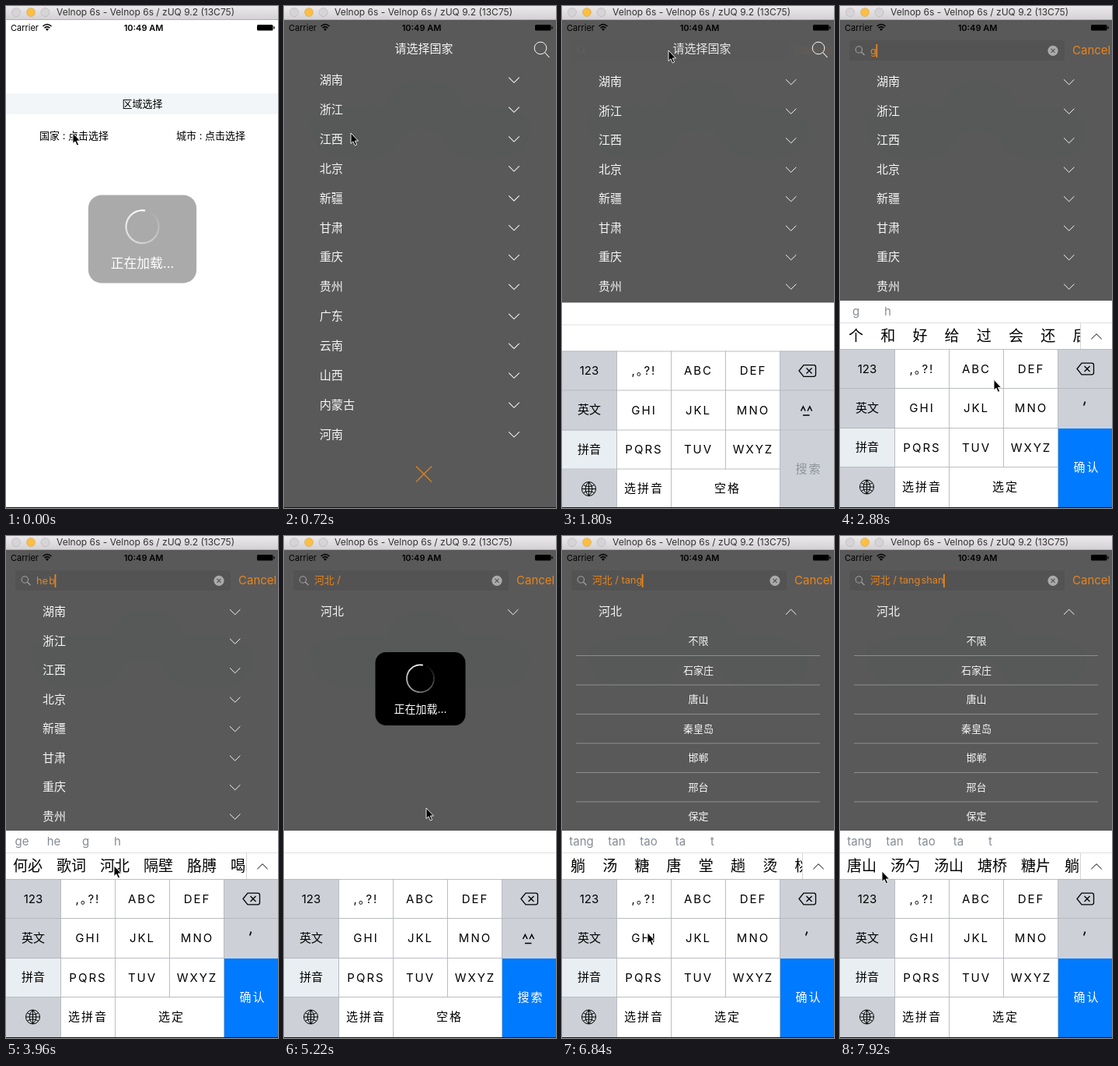
Recreate the animation shown at these times as an HTML page. Size 350x644 px, loop 8 s.

```html
<!DOCTYPE html>
<html lang="zh-CN">
<head>
<meta charset="utf-8">
<style>
html, body { margin: 0; width: 100%; height: 100%; overflow: hidden; background: #fff; }
svg { display: block; width: 100vw; height: 100vh; font-family: Inter, "Noto Sans CJK SC", "Noto Sans CJK", sans-serif; }
</style>
</head>
<body>
<svg id="stage" viewBox="0 0 350 644"></svg>
<script>
const stage = document.getElementById('stage');
const STEP = 180, LOOP = 8000, ORANGE = '#e8841c', BLUE = '#007aff', WHITE = '#f6f6f6';

const provinces = '湖南 浙江 江西 北京 新疆 甘肃 重庆 贵州 广东 云南 山西 内蒙古 河南'.split(' ');
const cities = '不限 石家庄 唐山 秦皇岛 邯郸 邢台 保定'.split(' ');

// step, field text, pinyin choices, candidates
const typing = [
  [0, '', '', ''],
  [14, 'g', 'g h', '个 和 好 给 过 会 还 后'],
  [17, 'he', 'ge he g h', '和 个 合 喝 给 何 河 歌'],
  [20, 'he\u200ab', 'ge he g h', '何必 歌词 河北 隔壁 胳膊 喝'],
  [24, '河北', '', ''],
  [27, '河北 /', '', ''],
  [33, '河北 / t', 't', '他 天 它 她 听 通 同 头'],
  [35, '河北 / ta', 'ta t', '他 它 她 踏 塔 台 太 才'],
  [36, '河北 / tan', 'tan tao ta t', '谈 叹 弹 探 摊 套 逃 桃'],
  [38, '河北 / tang', 'tang tan tao ta t', '躺 汤 糖 唐 堂 趟 烫 桃'],
  [40, '河北 / tang\u200as', 'tang tan tao ta t', '堂上 躺上 汤山 唐山 糖水 躺'],
  [41, '河北 / tang\u200ash', 'tang tan tao ta t', '堂上 躺上 汤山 唐山 糖水 躺'],
  [42, '河北 / tang\u200asha', 'tang tan tao ta t', '唐山 汤勺 汤山 塘桥 糖片 躺'],
  [43, '河北 / tang\u200ashan', 'tang tan tao ta t', '唐山 汤勺 汤山 塘桥 糖片 躺']
];

const pointer = [[4, 86, 163], [7, 329, 55], [8, 329, 55], [10, 137, 57], [12, 140, 300], [14, 108, 512],
  [17, 243, 463], [20, 176, 462], [22, 139, 423], [24, 138, 421], [26, 312, 582], [27, 310, 580],
  [29, 183, 349], [31, 165, 400], [33, 174, 560], [35, 175, 462], [36, 240, 512], [38, 110, 509],
  [40, 106, 562], [41, 108, 512], [42, 175, 462], [43, 238, 510], [44, 54, 430]];

// linear interpolation between [step, value, ...] points
function key(k, pts, col = 1) {
  if (k <= pts[0][0]) return pts[0][col];
  for (let i = 1; i < pts.length; i++) {
    const a = pts[i - 1], b = pts[i];
    if (k <= b[0]) return a[col] + (b[col] - a[col]) * (k - a[0]) / (b[0] - a[0]);
  }
  return pts[pts.length - 1][col];
}

// text centred vertically on y; Chinese glyphs sit lower than Latin capitals
const text = (x, y, s, size, fill = '#000', anchor = 'middle', more = '') =>
  `<text x="${x}" y="${y + size * (/[\u4e00-\u9fff]/.test(s) ? 0.33 : 0.36)}" font-size="${size}" fill="${fill}" text-anchor="${anchor}" ${more}>${s}</text>`;
const rect = (x, y, w, h, fill, r = 0) =>
  `<rect x="${x}" y="${y}" width="${w}" height="${h}" rx="${r}" fill="${fill}"/>`;
const line = (d, stroke, w = 1) =>
  `<path d="${d}" fill="none" stroke="${stroke}" stroke-width="${w}"/>`;
const dot = (x, y, r, fill, more = '') => `<circle cx="${x}" cy="${y}" r="${r}" fill="${fill}" ${more}/>`;
const group = (s, opacity, transform = '') => `<g opacity="${opacity}" transform="${transform}">${s}</g>`;
const zoom = (x, y, s) => `translate(${x} ${y}) scale(${s}) translate(${-x} ${-y})`;
const chevron = (x, y, up, color, w = 1) => {
  const d = up ? -3.3 : 3.3;
  return line(`M${x - 6.7} ${y - d}L${x} ${y + d}L${x + 6.7} ${y - d}`, color, w);
};

function windowBar() {
  return rect(0, 0, 350, 18, 'url(#bar)') + rect(0, 17, 350, 1, '#b0aeb0') +
    [['#d6d4d6', 13], ['#fdbe41', 32], ['#d6d4d6', 50.5]].map(([c, x]) =>
      dot(x, 8, 5.5, c, 'stroke="#0002" stroke-width=".8"')).join('') +
    text(65, 8, 'Velnop 6s - Velnop 6s / zUQ 9.2 (13C75)', 12, '#333', 'start');
}

function statusBar() {
  return text(6, 28, 'Carrier', 11, '#000', 'start') +
    text(177, 28, '10:49 AM', 11, '#000', 'middle', 'font-weight="600"') +
    line('M47.5 26Q53 21 58.5 26M49.5 28.3Q53 25 56.5 28.3', '#000', 1.5) +
    '<path d="M51 29.6Q53 28 55 29.6L53 32z"/>' +
    rect(323, 24, 20.5, 7.5, '#000', 1.5) + rect(344.3, 26.2, 1.4, 3.2, '#000', 0.6);
}

function home() {
  return rect(0, 112, 350, 27, '#f2f6f8') + text(175.5, 126, '区域选择', 13) +
    text(43, 167, '国家 : 点击选择', 13, '#000', 'start') +
    text(219, 167, '城市 : 点击选择', 13, '#000', 'start');
}

function backdrop() {
  return rect(0, 18, 350, 626, '#595959') +
    '<path fill="#525a57" opacity=".35" d="M35 140Q90 122 133 130Q140 96 180 95Q222 98 226 128Q320 125 317 160Q315 195 260 196Q215 195 208 175Q200 158 175 158Q150 158 142 182Q130 200 80 195Q30 190 35 140z"/>';
}

function list(k) {
  const rowY = i => 97.5 + 37.5 * i;
  const row = (s, i, up) => text(47, rowY(i), s, 15, WHITE, 'start') + chevron(294.7, rowY(i), up, WHITE);
  if (k < 27) return provinces.map((s, i) => row(s, i, false)).join('');
  const open = key(k, [[30, 0], [32, 1]]);
  const sub = cities.map((s, i) => text(175.5, 97.5 + 37.5 * (i + 1) * open, s, 13, WHITE) +
    line(`M18 ${97.5 + (37.5 * i + 56) * open}H332`, '#8e8e8e')).join('');
  return row('河北', 0, open > 0) + (open ? group(sub, open) : '');
}

function titleRow() {
  return text(180, 55.5, '请选择国家', 15, WHITE) +
    '<circle cx="330" cy="54" r="7.8" fill="none" stroke="#f6f6f6"/>' +
    line('M335.5 59.5L341.5 66', WHITE, 1.1);
}

function searchBar(s) {
  let out = rect(12, 44, 277, 26, '#535353', 4) +
    '<circle cx="24.3" cy="56" r="4.2" fill="none" stroke="#a2a2a2" stroke-width="1.1"/>' +
    line('M27.3 59L31.5 63', '#a2a2a2', 1.3) +
    text(39, 57, s, 12.8, ORANGE, 'start', 'id="field"') +
    '<rect id="caret" y="49" width="1.8" height="17" fill="' + ORANGE + '"/>' +
    text(299, 56.7, 'Cancel', 15, ORANGE, 'start');
  if (s) out += dot(274, 57.3, 6.6, '#aaa') + line('M271.5 54.8l5 5m0-5l-5 5', '#555', 1.2);
  return out;
}

function keyboard(s, pinyin, cands) {
  const busy = cands !== '', rows = [465.5, 516, 566.5, 617], rule = '#b3b6bc';
  const cap = (x, row, s) => text(x + 1, rows[row], s, 15, '#000', 'middle', 'letter-spacing="2"');
  let out = rect(0, 378, 350, 266, '#fff') + line('M0 406.5H350', '#dfe0e2');

  if (busy) {
    const py = pinyin.split(' '), words = cands.split(' ');
    const wide = py[0].length > 3 ? 9 : 0, pairs = words[0].length > 1;
    out += py.map((p, i) => text(20.5 + 41 * i + (i ? wide : wide / 2), 392, p, 15, '#868b95')).join('') +
      words.map((w, i) => text(pairs ? 9 + 56 * i : 11 + 41.2 * i, 424, w, 19, '#000', 'start')).join('') +
      rect(309, 408, 41, 32, '#fff') + line('M309.5 407V440', '#d4d6d9') + chevron(330, 424, true, '#000');
  }

  out += rect(0, 440, 70, 204, '#cdd1d7') + rect(0, 542, 70, 50, '#e9eef2') +
    rect(281, 440, 69, 102, '#cdd1d7') + rect(281, 542, 69, 102, s ? BLUE : '#cdd1d7') +
    line('M0 440.5H350M0 490.5H350M0 541.5H281M0 591.5H281M70.5 440V643M140.5 440V643M210.5 440V592M280.5 440V643', rule, 0.9);
  if (!s) out += line('M281 541.5H350', rule, 0.9);

  ['123', '英文', '拼音'].forEach((t, i) => out += text(35, rows[i], t, 15));
  [',｡?!', 'ABC', 'DEF', 'GHI', 'JKL', 'MNO', 'PQRS', 'TUV', 'WXYZ'].forEach((t, i) =>
    out += cap([104.5, 174.5, 245][i % 3], Math.floor(i / 3), t));
  out += cap(104.5, 3, '选拼音') + cap(212, 3, busy ? '选定' : '空格') +
    text(317.5, 591.7, busy ? '确认' : '搜索', 15, s ? '#fff' : '#8e939b', 'middle', 'letter-spacing="2"');

  // globe, backspace, face
  out += line('M25.5 617a9 9 0 1 0 18 0a9 9 0 1 0-18 0H43.5M34.5 608V626M34.5 608q-9 9 0 18q9-9 0-18M27.5 612q7 4 14 0M27.5 622q7-4 14 0', '#000', 1);
  out += line('M305 465.5l6-7.3H324q2.5 0 2.5 2.5v9.6q0 2.5-2.5 2.5H311zM314.5 462l7 7m0-7l-7 7', '#000', 1.3);
  out += busy ? line('M315.5 507.5l-1.8 5', '#000', 1.7)
    : line('M307.5 517l2.8-5.5 2.8 5.5M316 517l2.8-5.5 2.8 5.5M310 522.5h8.5', '#000', 1.5);
  return out;
}

function hud(y, scale, opacity, turn) {
  const n = 24, r = 17.5, at = a => `${r * Math.sin(a)} ${-r * Math.cos(a)}`;
  let ring = '';
  for (let i = 0; i < n; i++) {
    const a = -i * 0.25;
    ring += `<path d="M${at(a)}A${r} ${r} 0 0 0 ${at(a - 0.26)}" opacity="${1 - i / n}"/>`;
  }
  return group(rect(-58, -47, 116, 94, '#000', 14) +
    `<g transform="translate(0 -13.2) rotate(${turn})" fill="none" stroke="#fff" stroke-width="1.8">${ring}</g>` +
    text(0, 26.5, '正在加载...', 14, '#fff'), opacity, `translate(175.5 ${y}) scale(${scale})`);
}

function draw(k) {
  const [, s, pinyin, cands] = typing.filter(e => e[0] <= k).pop();
  const veil = key(k, [[2, 0], [4, 1]]);
  const grow = key(k, [[2, 1.1], [4, 1.0107], [5, 1]]);
  const drop = key(k, [[8, 266], [9, 50], [10, 2.5], [11, 0]]);
  const search = key(k, [[9, 0], [10, 0.08], [11, 0.6], [12, 1]]);
  const turn = 10 + 0.345 * k * STEP;

  let out = '<defs><linearGradient id="bar" x2="0" y2="1"><stop stop-color="#ebe9eb"/><stop offset="1" stop-color="#d2d0d2"/></linearGradient></defs>' +
    rect(0, 0, 350, 644, '#fff') + home();
  if (veil) {
    out += group(backdrop() + group(list(k), 1, zoom(175, 331, grow)) +
      line('M170 590.5l20 20m0-20l-20 20', ORANGE, 1.1) +
      group(titleRow(), k <= 10 ? 1 : 1 - search), veil);
  }
  if (search) out += group(searchBar(s), search);
  out += statusBar();
  if (drop < 266) out += group(keyboard(s, pinyin, cands), 1, `translate(0 ${drop})`);
  if (k < 4) {
    out += hud(299, key(k, [[0, 1.2], [1, 1], [2, 1], [3, 0.87]]), key(k, [[0, 0.33], [1, 1], [2, 1], [3, 0.4]]), turn);
  } else if (k > 27 && k < 32) {
    out += hud(196, key(k, [[28, 1.1], [29, 1], [30, 1], [31, 0.87]]), key(k, [[28, 0.6], [29, 1], [30, 1], [31, 0.3]]), turn);
  }
  out += windowBar() + rect(0, 643, 350, 1, '#111') +
    `<path transform="translate(${key(k, pointer)} ${key(k, pointer, 2)})" d="M0 0V13.5L3 10.8L5.3 16L7.6 15L5.3 10H9.5z" stroke="#fff" stroke-width=".9"/>`;
  stage.innerHTML = out;

  const caret = document.getElementById('caret');
  if (caret) {
    caret.setAttribute('x', 38.5 + document.getElementById('field').getComputedTextLength());
    caret.setAttribute('opacity', cands || k % 6 < 3 ? 1 : 0);
  }
}

let shown = -1;
function tick() {
  const k = Math.floor(performance.now() % LOOP / STEP);
  if (k !== shown) draw(shown = k);
  requestAnimationFrame(tick);
}
tick();
</script>
</body>
</html>
```
